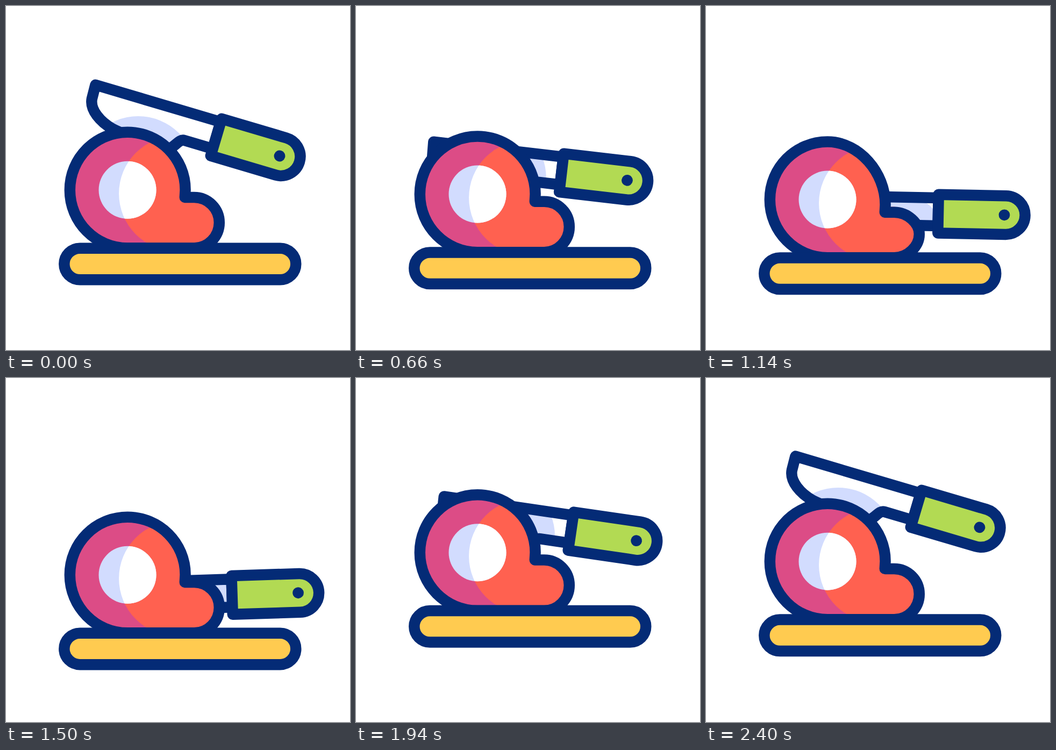
An HTML page that plays this animation: 640 by 640 pixels, repeating every 2.42 s.

```html
<!DOCTYPE html>
<html lang="en">
<head>
<meta charset="utf-8">
<title>Slicing meat</title>
<style>
  html, body { margin: 0; width: 100%; height: 100%; overflow: hidden; background: #fff; }
  svg { display: block; width: 100%; height: 100%; }
  .line { fill: none; stroke: #042b76; stroke-width: 20.5; stroke-linejoin: round; stroke-linecap: round; }
</style>
</head>
<body>
<svg viewBox="0 0 640 640">
  <defs>
    <path id="blade" d="M-123 -29.5H-366L-365 -3C-363 18 -338 34 -312 40C-285 45 -240 46 -205 46C-192 44 -190 22.5 -178 22.5H-123Z"/>
    <path id="light" d="M317 242A107 107 0 0 0 317 456H420V242Z"/>
    <clipPath id="bladeClip"><use id="bladeMask" href="#blade"/></clipPath>
    <clipPath id="meatClip"><path id="meatFill"/></clipPath>
    <clipPath id="boneClip"><circle cx="226" cy="342.3" r="53.5"/></clipPath>
  </defs>
  <g id="scene">
    <use id="bladeBase" href="#blade" fill="#fff"/>
    <g clip-path="url(#bladeClip)" fill="#d2dcfe">
      <g id="shade">
        <circle r="107"/>
        <circle cx="84" cy="76" r="47"/>
      </g>
    </g>
    <g id="knife">
      <use href="#blade" class="line"/>
      <path class="line" style="fill:#b2da53" d="M-123 -35.7H2.7A35.9 35.9 0 0 1 2.7 36.1H-123Z"/>
      <circle r="10.4" fill="#042b76"/>
    </g>
    <g clip-path="url(#meatClip)">
      <rect x="100" y="220" width="320" height="240" fill="#dc4c86"/>
      <use href="#light" fill="#ff6150"/>
    </g>
    <g clip-path="url(#boneClip)">
      <rect x="170" y="286" width="112" height="112" fill="#d2dcfe"/>
      <use href="#light" fill="#fff"/>
    </g>
    <path id="meatLine" class="line"/>
    <rect class="line" style="fill:#ffcb50" x="108.3" y="450.7" width="431" height="58.5" rx="29.25"/>
  </g>
</svg>
<script>
const LOOP = 2420, STEP = 20;
const PULLED = 1650, TOP = 2175; // end of the cut, top of the jump
const $ = id => document.getElementById(id);

// Knife poses inside the scene, each eased into the next.
const RAISED = { x: 509, y: 279, tilt: 16.5 };
const POSES = [
  { at: 0, ...RAISED },
  { at: 600, x: 503, y: 315, tilt: 6.8 },
  { at: 1200, x: 556.5, y: 372.6, tilt: 0.95 },
  { at: PULLED, x: 539, y: 376.9, tilt: -2.85 },
  { at: TOP, ...RAISED },
  { at: LOOP, ...RAISED }
];

const part = (t, from, to) => Math.min(1, Math.max(0, (t - from) / (to - from)));
const mix = (a, b, k) => a + (b - a) * k;
// Starts at rest and arrives with the given speed.
const ease = (u, speed = 0) => u * u * (3 - 2 * u) - speed * u * u * (1 - u);
const pulse = (t, from, to) => Math.sin(Math.PI * part(t, from, to)) ** 2;

function knifePose(t) {
  const i = POSES.findIndex(p => p.at > t), a = POSES[i - 1], b = POSES[i];
  const k = ease(part(t, a.at, b.at));
  return { x: mix(a.x, b.x, k), y: mix(a.y, b.y, k), tilt: mix(a.tilt, b.tilt, k) };
}

// The scene sinks under the cut, jumps, then drops back.
function sceneY(t) {
  const low = 25.5, high = -59;
  if (t < PULLED) return low * ease(part(t, 0, PULLED), 0.5);
  if (t < TOP) return mix(low, high, ease(part(t, PULLED, TOP), 0.5));
  return mix(high, 0, ease(part(t, TOP, LOOP)));
}

function meat(top, side, bump) {
  const y = 234.8 + top, r = 342 + side, b = 356 + bump;
  return `M226 450.4C166.8 450.4 118.8 402 118.8 342.4C118.8 ${282.8 + top / 2} 166.8 ${y} 226 ${y}`
    + `C285.5 ${y} 333.6 ${r - 59.2} 333.6 ${r}L332.8 ${b}H350`
    + `C375.8 ${b} 396.8 ${377 + bump} 396.8 ${403 + bump / 3}`
    + `C396.8 429 375.8 450.4 350 450.4Z`;
}

const place = (id, x, y, turn = 0) =>
  $(id).setAttribute('transform', `translate(${x} ${y}) rotate(${turn})`);

function draw(t) {
  const { x, y, tilt } = knifePose(t);
  place('scene', 0, sceneY(t));
  for (const id of ['bladeBase', 'bladeMask', 'knife']) place(id, x, y, tilt);
  place('shade', x - 254 - 0.55 * tilt, 312);
  const top = 13.3 * pulse(t, 100, 600), side = 10 * pulse(t, 800, 1460);
  $('meatLine').setAttribute('d', meat(top, side, side));
  // The flesh of the small lobe keeps its shape under the rim.
  $('meatFill').setAttribute('d', meat(top, side, 0));
}

const start = performance.now();
function tick(now) {
  const t = Math.max(0, now - start) % LOOP;
  draw(Math.floor(t / STEP) * STEP);
  requestAnimationFrame(tick);
}
draw(0);
requestAnimationFrame(tick);
</script>
</body>
</html>
```
